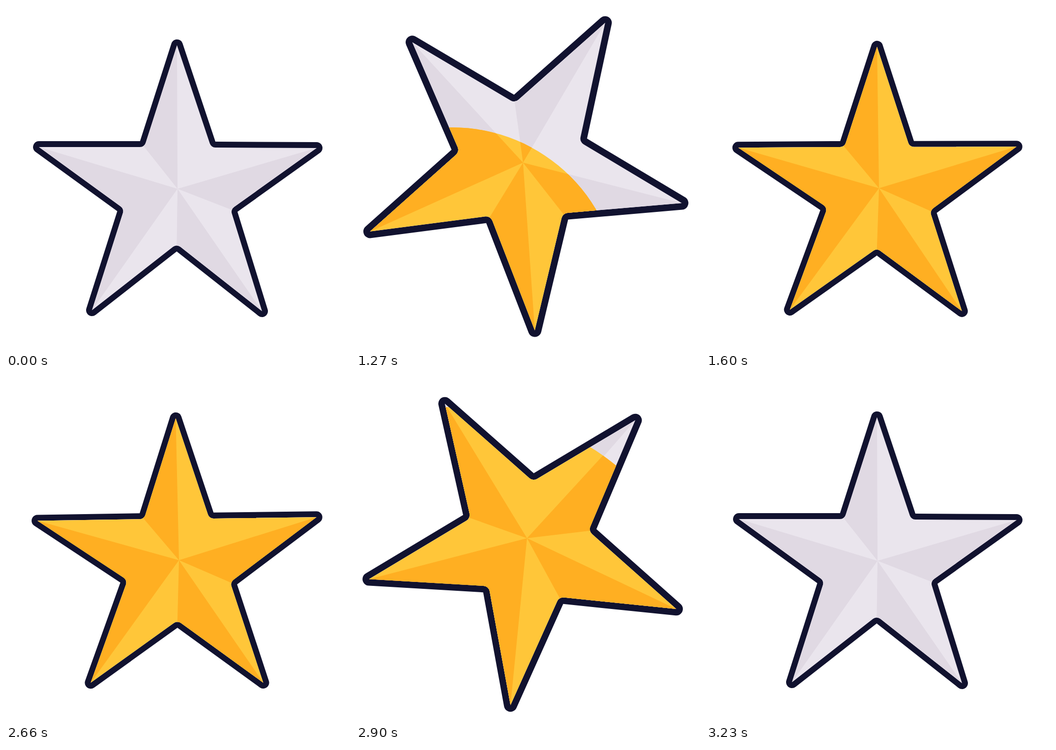
Recreate the animation shown at these times as an HTML page. Size 700 by 700 pixels, loop 3260 ms.

```html
<!DOCTYPE html>
<html lang="en">
<head>
<meta charset="utf-8">
<title>Star toggle</title>
<style>
  html, body { margin: 0; width: 100%; height: 100%; overflow: hidden; background: #fff; }
  svg { display: block; width: 100%; height: 100%; }
</style>
</head>
<body>
<svg viewBox="0 0 700 700">
  <defs>
    <clipPath id="body"><path class="outline"/></clipPath>
    <clipPath id="wipe"><circle id="spot" cx="195" cy="588" r="0"/></clipPath>
  </defs>
  <g class="pose">
    <path class="outline" fill="#11122f" stroke="#11122f" stroke-width="24" stroke-linejoin="round"/>
    <path class="outline" fill="#eae5ed"/>
    <path id="greyFacets" fill="#e0d9e3" clip-path="url(#body)"/>
  </g>
  <g clip-path="url(#wipe)">
    <g class="pose">
      <path class="outline" fill="#ffc639"/>
      <path id="goldFacets" fill="#ffaf22" clip-path="url(#body)"/>
    </g>
  </g>
</svg>
<script>
const LOOP = 3260, STEP = 30, STEPS = 20, FILL_AT = 1000, EMPTY_AT = 2630;
const PIVOT = [348.6, 379.2];
const FILLET = 12;
const PEAK = 0.42;

// Tips and notches, clockwise from the top tip
const points = [
  [348, 80], [417.5, 288], [632, 289], [457, 414], [521, 621],
  [347.4, 484.2], [175, 619], [240.5, 413], [67, 287], [281.5, 287]
];
const shades = 'LLDLDLDDLD';

const $ = id => document.getElementById(id);
const clamp = x => Math.min(1, Math.max(0, x));
const smooth = x => { x = clamp(x); return x * x * (3 - 2 * x); };
const at = i => points[(i + 10) % 10];
const fmt = p => p.map(v => v.toFixed(2)).join(' ');

// Moves from a towards b by a given length
function along(a, b, length) {
  const dx = b[0] - a[0], dy = b[1] - a[1], k = length / Math.hypot(dx, dy);
  return [a[0] + dx * k, a[1] + dy * k];
}

function outlinePath() {
  const parts = points.map((p, i) => {
    if (i % 2 === 0) return fmt(p);
    const a = at(i - 1), b = at(i + 1);
    const angle = Math.atan2(a[1] - p[1], a[0] - p[0]) - Math.atan2(b[1] - p[1], b[0] - p[0]);
    const cut = FILLET / Math.abs(Math.tan(angle / 2));
    return `${fmt(along(p, a, cut))}A${FILLET} ${FILLET} 0 0 0 ${fmt(along(p, b, cut))}`;
  });
  return 'M' + parts.join('L') + 'Z';
}

// Dark wedges around a hub, overshooting the outline that clips them
function facetPath(hub, shift) {
  const reach = p => fmt(p.map((v, k) => hub[k] + (v - hub[k]) * 1.3));
  return points.map((p, i) => shades[(i + shift) % 10] === 'D'
    ? `M${fmt(hub)}L${reach(p)}L${reach(at(i + 1))}Z` : '').join('');
}

const turnedOff = facetPath([349, 372], 0);
const turnedOn = facetPath([342, 372.2], 2);
const poses = document.querySelectorAll('.pose');

function progress(t) {
  const run = start => clamp(Math.floor((t - start) / STEP) / STEPS);
  return run(FILL_AT) - run(EMPTY_AT);
}

function draw(t) {
  const p = progress(t);
  const turn = smooth(p);
  const angle = 72 * turn;
  const hop = p < PEAK ? smooth(p / PEAK) : smooth((1 - p) / (1 - PEAK));
  const lift = 56 * hop * hop;
  const lean = 1.3 * (angle - 40.9) * Math.PI / 180;
  const x = PIVOT[0] - 1.2 * turn + lift * Math.sin(lean);
  const y = PIVOT[1] - lift * Math.cos(lean);
  const pose = `translate(${x} ${y}) rotate(${angle}) scale(${1 + 0.131 * hop}) translate(${-PIVOT[0]} ${-PIVOT[1]})`;
  poses.forEach(g => g.setAttribute('transform', pose));
  $('spot').setAttribute('r', 870 * smooth((p - 0.155) / 0.69));
  $('goldFacets').setAttribute('d', p < 0.5 ? turnedOff : turnedOn);
}

document.querySelectorAll('.outline').forEach(el => el.setAttribute('d', outlinePath()));
$('greyFacets').setAttribute('d', turnedOff);

const start = performance.now();
function tick() {
  draw((performance.now() - start) % LOOP);
  requestAnimationFrame(tick);
}
tick();
</script>
</body>
</html>
```
